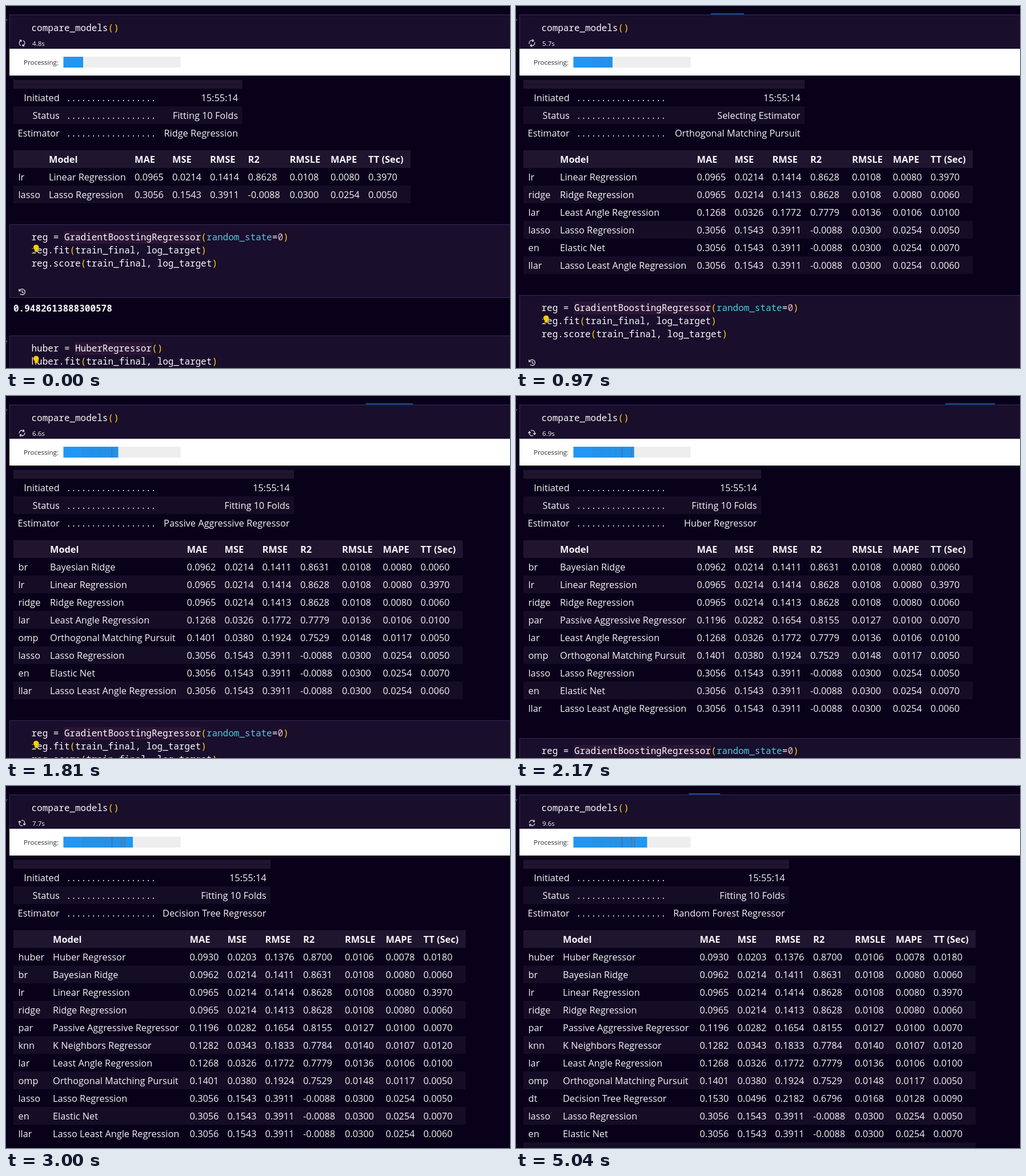
An HTML page with a canvas that plays this animation: 882x635 px, repeating every 5.11 s.

```html
<!DOCTYPE html>
<html lang="en">
<head>
<meta charset="utf-8">
<title>Model comparison</title>
<style>
html, body { margin: 0; width: 100%; height: 100%; overflow: hidden; background: #09001a; }
canvas { display: block; }
</style>
</head>
<body>
<canvas id="stage" width="882" height="635"></canvas>
<script>
const ctx = document.getElementById('stage').getContext('2d');
const LOOP = 5110;
const FAMILY = '"Open Sans", "Noto Sans", sans-serif';
const SANS = '500 16.3px ' + FAMILY;
const BOLD = 'bold 16.35px ' + FAMILY;
const SMALL = '500 11.6px ' + FAMILY;
const MONO = '500 15.95px "Noto Sans Mono", "DejaVu Sans Mono", monospace';
const RESULT = '600 16px "Noto Sans Mono", "DejaVu Sans Mono", monospace';
const CHAR = 9.575;
const C = {
  page: '#09001a', cell: '#190e2b', border: '#3a2859', header: '#1f152e', zebra: '#150c25',
  text: '#f6f5f8', code: '#fbfafd', gold: '#ffd60a', cyan: '#45cfe0', pink: '#eeb9c6', mark: '#2b1535'
};

// Best score first; `turn` is the order in which the models finish.
const MODELS = [
  [9, 'huber', 'Huber Regressor', '0.0930 0.0203 0.1376 0.8700 0.0106 0.0078 0.0180'],
  [7, 'br', 'Bayesian Ridge', '0.0962 0.0214 0.1411 0.8631 0.0108 0.0080 0.0060'],
  [0, 'lr', 'Linear Regression', '0.0965 0.0214 0.1414 0.8628 0.0108 0.0080 0.3970'],
  [2, 'ridge', 'Ridge Regression', '0.0965 0.0214 0.1413 0.8628 0.0108 0.0080 0.0060'],
  [8, 'par', 'Passive Aggressive Regressor', '0.1196 0.0282 0.1654 0.8155 0.0127 0.0100 0.0070'],
  [10, 'knn', 'K Neighbors Regressor', '0.1282 0.0343 0.1833 0.7784 0.0140 0.0107 0.0120'],
  [4, 'lar', 'Least Angle Regression', '0.1268 0.0326 0.1772 0.7779 0.0136 0.0106 0.0100'],
  [6, 'omp', 'Orthogonal Matching Pursuit', '0.1401 0.0380 0.1924 0.7529 0.0148 0.0117 0.0050'],
  [11, 'dt', 'Decision Tree Regressor', '0.1530 0.0496 0.2182 0.6796 0.0168 0.0128 0.0090'],
  [1, 'lasso', 'Lasso Regression', '0.3056 0.1543 0.3911 -0.0088 0.0300 0.0254 0.0050'],
  [3, 'en', 'Elastic Net', '0.3056 0.1543 0.3911 -0.0088 0.0300 0.0254 0.0070'],
  [5, 'llar', 'Lasso Least Angle Regression', '0.3056 0.1543 0.3911 -0.0088 0.0300 0.0254 0.0060']
].map(([turn, id, name, scores]) => ({ turn, id, name, scores: scores.split(' ') }));
const HEADS = ['MAE', 'MSE', 'RMSE', 'R2', 'RMSLE', 'MAPE', 'TT (Sec)'];
const COLUMNS = [0, 66, 132, 198.5, 271.5, 343, 409];

// Start time and status table's right edge for each model from the third on.
const RUNS = [
  [-100, 413.5], [130, 429], [390, 458.5], [680, 505], [960, 505], [1260, 429],
  [1610, 504], [1950, 429], [2330, 456.5], [2700, 463], [3050, 478]
];

function rect(x, y, w, h, color) {
  ctx.fillStyle = color;
  ctx.fillRect(x, y, w, h);
}

function text(str, x, y, font = SANS, color = C.text, align = 'left') {
  ctx.font = font;
  ctx.fillStyle = color;
  ctx.textAlign = align;
  ctx.fillText(str, x, y);
}

function code(y, ...parts) {
  let x = 44.5;
  for (const [str, color = C.code] of parts) {
    text(str, x, y, MONO, color);
    x += str.length * CHAR;
  }
}

function call(y, name, args = '') {
  code(y, [name], ['(', C.gold], [args], [')', C.gold]);
}

function cell(y, h) {
  rect(6, y, 876, h, C.border);
  rect(7, y + 1, 875, h - 2, C.cell);
}

function bulb(y) {
  rect(47, y - 8, 8.5, 15, C.cell);
  ctx.fillStyle = '#ffcc00';
  ctx.beginPath();
  ctx.arc(52.7, y - 1.5, 4.8, 0, 7);
  ctx.fill();
  rect(50.2, y + 2, 5, 4.5, '#ffcc00');
}

function tick(y) {
  ctx.strokeStyle = '#8f8a99';
  ctx.lineWidth = 1;
  path([0, y + 2], [2, y - 1]);
}

function icon(x, y, angle, draw) {
  ctx.save();
  ctx.translate(x, y);
  ctx.rotate(angle);
  ctx.strokeStyle = '#dcd9e2';
  ctx.lineWidth = 1.4;
  draw();
  ctx.restore();
}

function path(...points) {
  ctx.beginPath();
  points.forEach(([x, y]) => ctx.lineTo(x, y));
  ctx.stroke();
}

function syncIcon(angle) {
  icon(28, 65, angle, () => {
    for (let i = 0; i < 2; i++) {
      ctx.beginPath();
      ctx.arc(0, 0, 4.8, 2, 4.5);
      ctx.stroke();
      path([-4.2, -5.2], [-1, -4.7], [-1.6, -1.8]);
      ctx.rotate(Math.PI);
    }
  });
}

function historyIcon(y) {
  icon(28, y, 0, () => {
    ctx.beginPath();
    ctx.arc(0.3, 0, 5, -2.8, 2.4);
    ctx.stroke();
    path([-5.3, -5], [-5.3, -1.6], [-1.8, -1.6]);
    path([0.3, -2.8], [0.3, 0.4], [2.8, 1.8]);
  });
}

function topLine(clock) {
  const p = clock % 4000;
  if (p < 25) return;
  const unit = 29.87, half = p / 2000 - 1;
  const shift = half < 0 ? 25 * (half + 1) : 25 + 24 * half;
  const width = unit * (3 - 2 * Math.abs(half));
  rect((shift + 0.5) * unit - width / 2, 13, width, 1.5, '#0e70c0');
}

function progressBar(units) {
  const width = units * 3.42;
  rect(6, 75, 876, 47, '#fff');
  text('Processing:', 31, 103, SMALL, '#2a2a2a');
  rect(100.5, 89, 205, 19, '#eee');
  ctx.save();
  ctx.beginPath();
  ctx.rect(100.5, 89, width, 19);
  ctx.clip();
  rect(100, 89, 206, 19, '#2196f3');
  rect(134, 89, 67, 19, '#2392e9');
  for (const x of [134, 149, 163, 174]) rect(x, 89, 1, 19, '#2a8bdc');
  rect(184, 89, 3, 19, '#3280c6');
  rect(201, 89, 3, 19, '#3b82c4');
  rect(206, 89, 3, 19, '#4580b4');
  ctx.restore();
}

function statusTable(right, status, estimator) {
  rect(13, 129.5, right - 13, 15.5, C.header);
  rect(13, 137, right - 13, 1, '#171022');
  rect(13, 176, right - 13, 31, C.zebra);
  [['Initiated', '15:55:14'], ['Status', status], ['Estimator', estimator]].forEach(([label, value], i) => {
    const y = 167 + 31 * i;
    text(label, 93.7, y, SANS, C.text, 'right');
    for (let d = 0; d < 18; d++) text('.', 107.5 + d * 8.72, y);
    text(value, right - 7.5, y, SANS, C.text, 'right');
  });
}

function scoreTable(done) {
  const rows = MODELS.filter(m => m.turn < done);
  const modelX = done > 9 ? 82 : done > 2 ? 77 : 75;
  const scoreX = modelX + (done > 5 ? 239.5 : done > 4 ? 193 : 150);
  const width = scoreX + 470;
  rect(13, 253, width, 31, C.header);
  text('Model', modelX, 275, BOLD);
  HEADS.forEach((head, i) => text(head, scoreX + COLUMNS[i], 275, BOLD));
  rows.forEach((row, r) => {
    const y = 284 + 31 * r;
    if (r % 2) rect(13, y, width, 31, C.zebra);
    text(row.id, 21.5, y + 22);
    text(row.name, modelX, y + 22);
    row.scores.forEach((score, i) => text(score, scoreX + COLUMNS[i], y + 22));
  });
  return 284 + 31 * rows.length;
}

function lowerCells(y) {
  cell(y, 129);
  rect(101.5, y + 12, 240, 22, C.mark);
  code(y + 28, ['reg = GradientBoostingRegressor'], ['(', C.gold], ['random_state', C.cyan],
    ['='], ['0', C.pink], [')', C.gold]);
  call(y + 51, 'reg.fit', 'train_final, log_target');
  call(y + 74, 'reg.score', 'train_final, log_target');
  bulb(y + 42);
  historyIcon(y + 118.5);
  text('0.9482613888300578', 13, y + 153, RESULT);

  const next = y + 195;
  cell(next, 129);
  rect(120.5, next + 12, 135, 22, C.mark);
  call(next + 28, 'huber = HuberRegressor');
  call(next + 51, 'huber.fit', 'train_final, log_target');
  bulb(next + 42);
  tick(next + 10);
}

function draw(time) {
  const t = Math.floor((time + 10) / 70) * 70 - 10;
  const clock = 21 + 0.9587 * t;
  const run = RUNS.findLastIndex(([start]) => t >= start);
  const [start, right] = RUNS[run];
  const done = run + 2;
  const fitting = t >= start + 90;
  const units = done < 10 ? done * 3 + (fitting ? 4 : 2) : 33.4 + (done - 10) * 2.15;
  const current = MODELS.find(m => m.turn === done);

  rect(0, 0, 882, 635, C.page);
  topLine(clock);
  cell(15, 62);
  tick(24);
  call(44, 'compare_models');
  syncIcon(Math.floor(clock / 50) * Math.PI / 15);
  const seconds = Math.floor((4.871 + 0.000956 * t) * 10) / 10;
  text(seconds.toFixed(1) + 's', 46, 69.5, SMALL);
  progressBar(units);
  statusTable(right, fitting ? 'Fitting 10 Folds' : 'Selecting Estimator',
    current ? current.name : 'Random Forest Regressor');
  lowerCells(scoreTable(done) + 37);
}

function animate() {
  draw(performance.now() % LOOP);
  requestAnimationFrame(animate);
}
animate();
</script>
</body>
</html>
```
